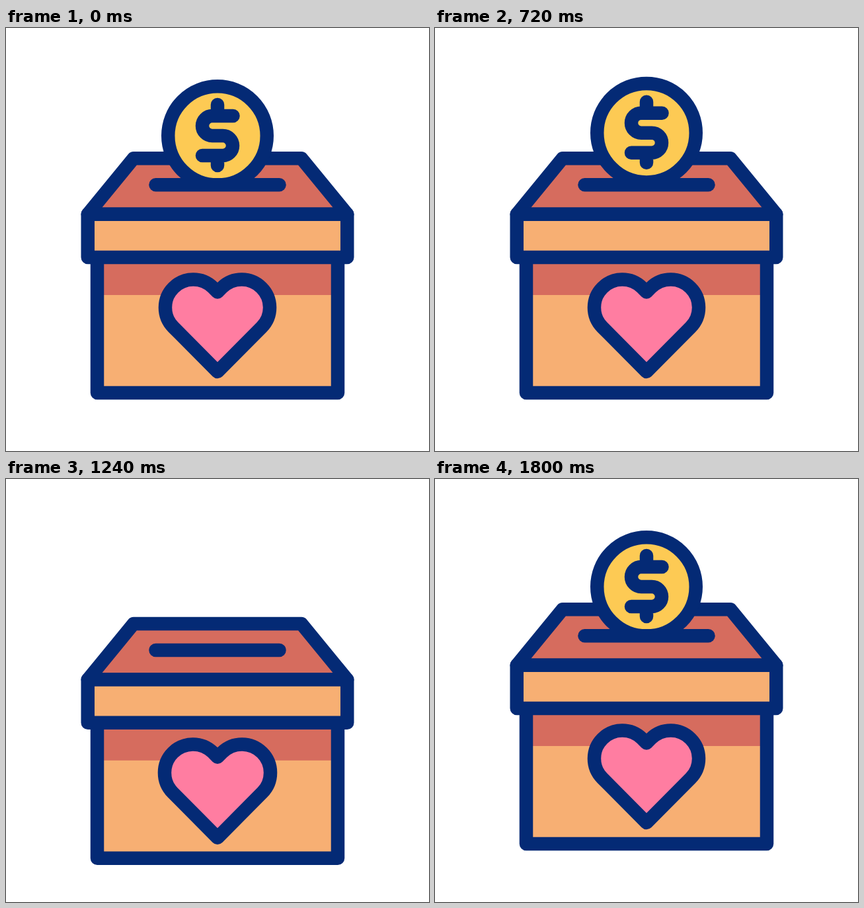
Write an HTML page that moves like this. It is 640 by 640 pixels and loops after 1.84 s.

```html
<!DOCTYPE html>
<html lang="en">
<head>
<meta charset="utf-8">
<title>Donation box</title>
<style>
  html, body { margin: 0; width: 100%; height: 100%; overflow: hidden; background: #fff; }
  svg { display: block; width: 100vw; height: 100vh; }
  .line { stroke: #042a75; stroke-width: 20.5; stroke-linecap: round; stroke-linejoin: round; }
  .side { fill: #f7af73; }
  .shade { fill: #d66c5e; }
  .gold { fill: #fdca54; }
  .pink { fill: #ff7da1; vector-effect: non-scaling-stroke; }
  .open { fill: none; }
</style>
</head>
<body>
<svg viewBox="0 0 640 640">
  <defs>
    <clipPath id="aboveSlot"><rect y="-100" width="640" height="337"/></clipPath>
  </defs>
  <g id="box">
    <rect class="side" x="138" y="347" width="364" height="205"/>
    <rect class="shade" x="138" y="347" width="364" height="57"/>
    <path class="line open" d="M138 347V552H502V347"/>
    <path class="line shade" d="M123.75 281.75L193 197.25H447L516.25 281.75Z"/>
    <rect class="line side" x="123.75" y="281.75" width="392.5" height="65.25"/>
    <path id="heart" class="line pink"
      d="M320 399.5L313 392.5A42.43 42.43 0 0 0 253 452.5L320 520L387 452.5A42.43 42.43 0 0 0 327 392.5Z"/>
    <g clip-path="url(#aboveSlot)">
      <g id="coin">
        <circle class="line gold" cx="320" cy="163" r="74.75"/>
        <path class="line open"
          d="M343.5 133H312a15 15 0 0 0 0 30H328a15 15 0 0 1 0 30H297M320 116V133M320 193V208"/>
      </g>
    </g>
    <path class="line open" d="M226.5 237.25H413.5"/>
  </g>
</svg>
<script>
const LOOP = 1840, STEP = 40;
const RISE = 64, DROP = 230, SINK = 21.8, SWELL = 0.145;

// Smooth 0 to 1 between two times.
function ramp(time, from, to) {
  const s = Math.min(1, Math.max(0, (time - from) / (to - from)));
  return s * s * (3 - 2 * s);
}

const beat = (time, peak) =>
  ramp(time, peak - 280, peak - 60) - ramp(time, peak + 60, peak + 280);

const boxShift = time => SINK * (ramp(time, 760, 1120) - ramp(time, 1240, 1600));

const coinShift = time =>
  DROP * ramp(time, 640, 880) - RISE * ramp(time, 80, 500) - (DROP - RISE) * ramp(time, 1200, 1570);

const heartScale = time => 1 + SWELL * (beat(time, 400) + beat(time, 1000));

const [box, coin, heart] = ["box", "coin", "heart"].map(id => document.getElementById(id));
const start = performance.now();

function draw(now) {
  const elapsed = Math.max(0, now - start) % LOOP;
  const time = Math.floor(elapsed / STEP) * STEP;
  box.setAttribute("transform", `translate(0 ${boxShift(time)})`);
  coin.setAttribute("transform", `translate(0 ${coinShift(time)})`);
  heart.setAttribute("transform",
    `translate(320 450) scale(${heartScale(time)}) translate(-320 -450)`);
  requestAnimationFrame(draw);
}
draw(start);
</script>
</body>
</html>
```
